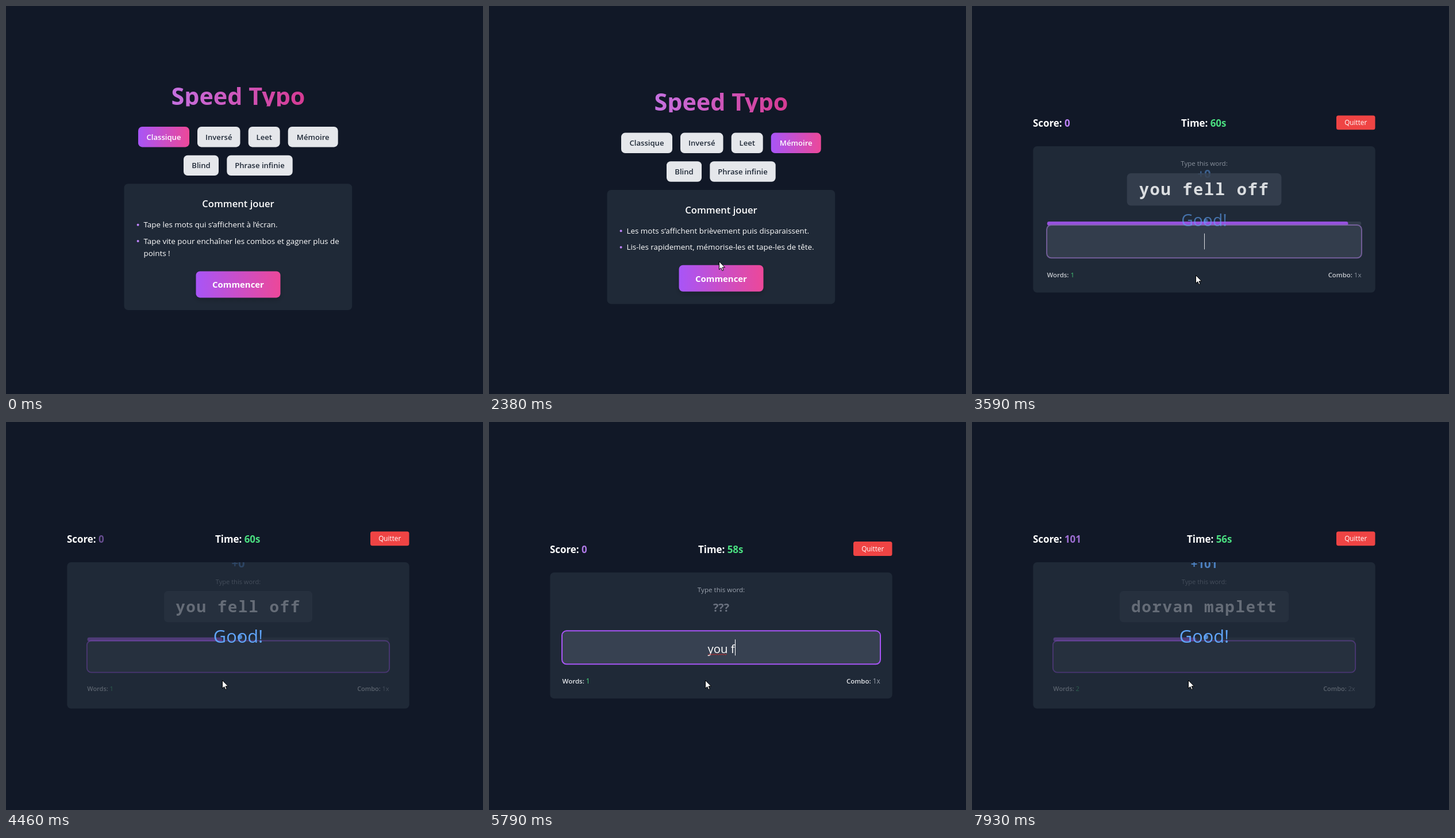
These frames come from a looping animation (830 px wide and 675 px high, 7990 ms). An HTML page with a canvas:

```html
<!DOCTYPE html>
<html lang="fr">
<head>
<meta charset="utf-8">
<title>Speed Typo</title>
<style>
  html, body { margin: 0; width: 100%; height: 100%; overflow: hidden; background: #111827; }
  canvas { display: block; }
</style>
</head>
<body>
<canvas id="stage" width="830" height="675"></canvas>
<script>
const ctx = document.getElementById('stage').getContext('2d');
const LOOP = 7990, CX = 404, CY = 371;
const SANS = '"Open Sans", "Noto Sans", sans-serif';
const MONO = '"Noto Sans Mono", "DejaVu Sans Mono", monospace';
const PANEL = '#1f2937', FIELD = '#374151', PURPLE = '#a855f7', BLUE = '#60a5fa';

// Moments of the session, in ms
const PICK = 1660, START = 3500, HIDE = 5050, NEXT = 7050;
const KEYS = [5190, 5270, 5400, 5500, 5780, 5950, 6150, 6330, 6620, 6700, 6810, 6930];
const ANSWER = 'you fell off';
const ROUNDS = [
  { at: START, word: ANSWER, gain: '+0', words: 1, barAt: 3520, barFor: 1700 },
  { at: NEXT, word: 'dorvan maplett', gain: '+101', words: 2, barAt: 7220, barFor: 1350 }
];
const POINTER = [
  [590, 814, 332], [800, 715, 280], [1000, 620, 243], [1330, 535, 226], [1660, 535, 226],
  [1900, 500, 290], [2200, 425, 405], [2380, 400, 444], [2720, 379, 457], [3310, 379, 457],
  [3380, 389, 460], [3520, 389, 462], [3590, 389, 468], [3800, 388, 466], [4260, 376, 449]
];

const clamp = v => Math.max(0, Math.min(1, v));
const mix = (a, b, p) => a + (b - a) * p;
const easeOut = p => 1 - (1 - p) ** 2;
const smooth = p => p * p * (3 - 2 * p);

function box(x, y, w, h, r, fill) {
  ctx.fillStyle = fill;
  ctx.beginPath();
  ctx.roundRect(x, y, w, h, r);
  ctx.fill();
}

function text(s, x, y, size, color, weight = 400, align = 'left', family = SANS) {
  ctx.font = `${weight} ${size}px ${family}`;
  ctx.textAlign = align;
  ctx.fillStyle = color;
  ctx.fillText(s, x, y);
  return ctx.measureText(s).width;
}

function gradient(x, w, from = PURPLE, to = '#ec4899') {
  const g = ctx.createLinearGradient(x, 0, x + w, 0);
  g.addColorStop(0, from);
  g.addColorStop(1, to);
  return g;
}

function scaled(x, y, k, draw) {
  ctx.save();
  ctx.translate(x, y);
  ctx.scale(k, k);
  ctx.translate(-x, -y);
  draw();
  ctx.restore();
}

function pointerAt(t) {
  if (t < POINTER[0][0]) return null;
  const i = POINTER.findIndex(p => p[0] > t);
  if (i < 0) return POINTER.at(-1).slice(1);
  const [t0, x0, y0] = POINTER[i - 1], [t1, x1, y1] = POINTER[i];
  const p = (t - t0) / (t1 - t0);
  return [mix(x0, x1, p), mix(y0, y1, p)];
}

function drawPointer(x, y) {
  ctx.save();
  ctx.translate(Math.round(x) + 0.5, Math.round(y) + 0.5);
  ctx.beginPath();
  [[0, 0], [0, 14], [3.2, 11], [5.4, 16], [7.6, 15], [5.5, 10.3], [10, 10.3]]
    .forEach(p => ctx.lineTo(...p));
  ctx.closePath();
  ctx.fillStyle = '#fff';
  ctx.fill();
  ctx.strokeStyle = '#000';
  ctx.lineWidth = 1;
  ctx.stroke();
  ctx.restore();
}

// ---- Menu ----
const MODES = [
  ['Classique', 230, 210, 89], ['Inversé', 333, 210, 74.5], ['Leet', 421.7, 210, 55],
  ['Mémoire', 490.7, 210, 87], ['Blind', 309, 259.7, 61], ['Phrase infinie', 384.3, 259.7, 114.4]
];
const RULES = {
  Classique: ['•Tape les mots qui s’affichent à l’écran.',
    '•Tape vite pour enchaîner les combos et gagner plus de', 'points !'],
  Mémoire: ['•Les mots s’affichent brièvement puis disparaissent.',
    '•Lis-les rapidement, mémorise-les et tape-les de tête.']
};

function drawMenu(t, pointer) {
  const active = t < PICK ? 'Classique' : 'Mémoire';
  const dy = t < PICK ? 0 : 10.6;
  const bottom = 529 - dy;

  ctx.save();
  ctx.beginPath();
  ctx.rect(200, 120 + dy, 410, 54.5);
  ctx.clip();
  text('Speed Typo', CX, 171.5 + dy, 41.3, gradient(206, 396, '#c084fc', '#db2777'), 700, 'center');
  ctx.restore();

  for (const [name, x, y0, w] of MODES) {
    const y = y0 + dy, on = name === active;
    const hover = pointer && pointer[0] > x && pointer[0] < x + w && pointer[1] > y && pointer[1] < y + 35.4;
    box(x, y, w, 35.4, 7, on ? gradient(x, w) : hover ? '#d1d5db' : '#e5e7eb');
    text(name, x + w / 2, y + 22.7, 13.1, on ? '#fff' : '#1f2937', 600, 'center');
  }

  box(205.5, 309.3 + dy, 396.7, bottom - 309.3 - dy, 7, PANEL);
  text('Comment jouer', CX, 350 + dy, 16.6, '#fff', 600, 'center');
  let y = 385.3 + dy;
  for (const line of RULES[active]) {
    const bullet = line[0] === '•';
    if (bullet) box(227.6, y - 6.6, 4, 4, 2, '#c084fc');
    text(line.replace('•', ''), 239.5, y, 13.42, '#fff');
    y += line.includes('plus de') ? 21.3 : 28.4;
  }

  const top = bottom - 67.6;
  scaled(CX, top + 23, mix(1, 1.05, easeOut(clamp((t - 2430) / 150))), () => {
    ctx.save();
    ctx.shadowColor = 'rgba(0,0,0,.2)';
    ctx.shadowBlur = 9;
    ctx.shadowOffsetY = 4;
    box(330.5, top, 147, 46, 7, gradient(330.5, 147));
    ctx.restore();
    text('Commencer', CX, top + 28.7, 14.9, '#fff', 700, 'center');
  });
}

// ---- Game ----
function drawHeader(t, dy) {
  const won = t >= NEXT;
  const pulse = 0.75 + 0.25 * Math.cos((t - START) / 1000 * Math.PI);
  const y = 210 + dy;
  const label = (s, x) => x + text(s, x, y, 16.9, '#fff', 700);
  const scoreX = label('Score: ', 106);
  ctx.globalAlpha = pulse;
  text(won ? '101' : '0', scoreX, y, 16.9, '#c084fc', 700);
  ctx.globalAlpha = 1;
  const left = 60 - Math.floor((t - START) / 1000);
  text(left + 's', label('Time: ', won ? 374 : 364), y, 16.9, '#4ade80', 700);
  box(634, 190.4 + dy, 67.5, 24.8, 3.5, '#ef4444');
  text('Quitter', 667.7, 207.2 + dy, 11.75, '#fff', 400, 'center');
}

function drawInput(y, border, typed, caret) {
  box(127.5, y + 1.5, 553, 57, 7.5, FIELD);
  ctx.strokeStyle = border;
  ctx.lineWidth = 2;
  ctx.beginPath();
  ctx.roundRect(127, y + 1, 554, 58, 8);
  ctx.stroke();

  ctx.font = `400 20.3px ${SANS}`;
  const w = ctx.measureText(typed).width, x = CX - w / 2;
  text(typed, x, y + 39.3, 20.3, '#fff');
  if (typed.includes(' ')) {
    const end = x + ctx.measureText('you').width;
    ctx.strokeStyle = '#dc2626';
    ctx.lineWidth = 1;
    ctx.beginPath();
    for (let i = 0, px = x + 1; px < end; i++, px += 2) ctx.lineTo(px, y + 41 + (i % 2) * 2);
    ctx.stroke();
  }
  if (caret) {
    ctx.fillStyle = '#fff';
    ctx.fillRect(Math.round(x + w), y + 16, 1, 28);
  }
}

function drawFooter(y, words) {
  const x = 127.5 + text('Words: ', 127.5, y, 11.5, '#e5e7eb', 600);
  text(words, x, y, 11.7, '#4ade80');
  const w = text(words + 'x', 680.5, y, 11.7, '#9ca3af', 400, 'right');
  text('Combo: ', 680.5 - w, y, 11.5, '#e5e7eb', 600, 'right');
}

const drawHint = y => text('Type this word:', CX, y, 11.65, '#9ca3af', 400, 'center');
const blink = ms => ms % 1060 < 530;

function drawRecall(t) {
  box(106.3, 261.7, 595.4, 219.3, 7, PANEL);
  drawHint(296);
  text('???', CX, 330, 19.6, '#6b7280', 700, 'center');
  const count = KEYS.filter(k => k <= t).length;
  drawInput(362.3, PURPLE, ANSWER.slice(0, count), blink(t - (KEYS[count - 1] || HIDE)));
  drawFooter(455.4, 1);
}

function drawReveal(t, round) {
  const age = t - round.at;
  const back = clamp((age - 1000) / 300);
  const dim = smooth(clamp(age / 300)) * (1 - smooth(back));
  const good = easeOut(clamp(age / 250)) * (1 - clamp((age - 1000) / 200));

  box(106.3, 244, 595.4, 254.5, 7, PANEL);
  ctx.save();
  ctx.beginPath();
  ctx.rect(106.3, 244, 595.4, 254.5);
  ctx.clip();

  ctx.globalAlpha = clamp(Math.min(age / 200, (1000 - age) / 170));
  text(round.gain, CX, 309 - 56 * easeOut(clamp(age / 1000)), 20.3, BLUE, 700, 'center');

  ctx.globalAlpha = mix(1, 0.3, dim);
  scaled(CX, CY, mix(1, 0.95, dim), () => {
    drawHint(277.3);
    const w = round.word.length * 19.1 + 42.6;
    box(CX - w / 2, 290, w, 57, 7, FIELD);
    ctx.letterSpacing = '1.7px';
    text(round.word, CX, 328.5, 29, '#f9fafb', 700, 'center', MONO);
    ctx.letterSpacing = '0px';

    box(127.7, 375, 552.6, 7, 3.5, FIELD);
    box(127.7, 375, 552.6 * (1 - clamp((t - round.barAt) / round.barFor)), 7, 3.5, PURPLE);
    const p = round.at === START ? clamp(age / 250) : 1;
    const border = `rgb(${mix(107, 168, p)},${mix(114, 85, p)},${mix(128, 247, p)})`;
    drawInput(380, border, '', blink(age));
    drawFooter(473.3, round.words);
  });

  scaled(CX, 373, mix(0.8, 1, good), () => {
    ctx.globalAlpha = good * 0.75;
    box(403, 370, 8, 8, 4, BLUE);
    ctx.globalAlpha = good;
    text('Good!', CX, 384, 30.7, BLUE, 400, 'center');
  });
  ctx.restore();
}

function draw(t) {
  const pointer = pointerAt(t);
  ctx.globalAlpha = 1;
  ctx.fillStyle = '#111827';
  ctx.fillRect(0, 0, 830, 675);
  if (t < START) {
    drawMenu(t, pointer);
  } else {
    const recall = t >= HIDE && t < NEXT;
    drawHeader(t, recall ? 17.7 : 0);
    if (recall) drawRecall(t);
    else drawReveal(t, ROUNDS[t < HIDE ? 0 : 1]);
  }
  if (pointer) drawPointer(...pointer);
}

const began = performance.now();
function tick() {
  draw((performance.now() - began) % LOOP);
  requestAnimationFrame(tick);
}
tick();
</script>
</body>
</html>
```
